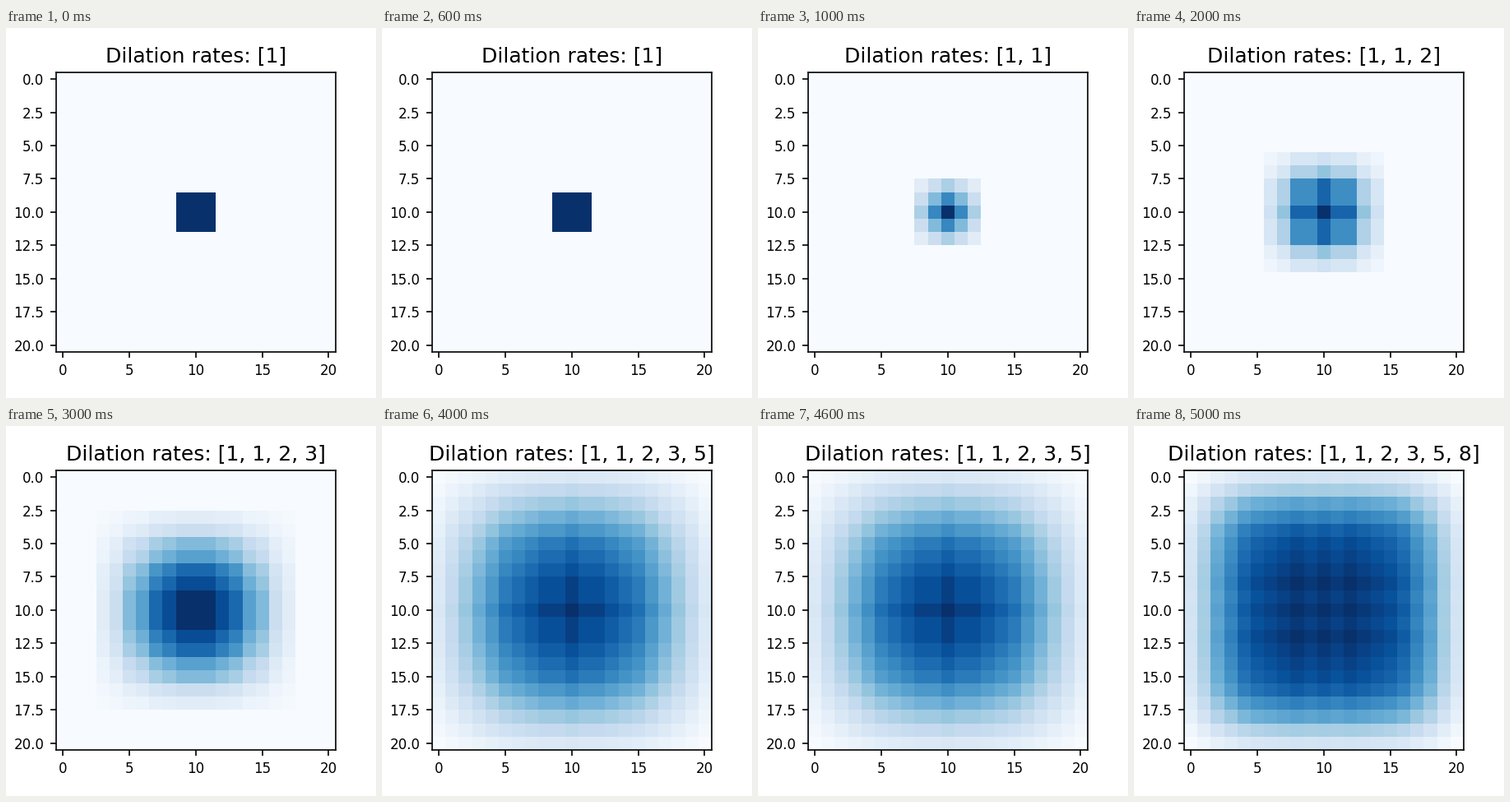
A matplotlib script that plays this animation: 450x450 px, repeating every 6000 ms.

```python
import numpy as np
import matplotlib.pyplot as plt
from matplotlib.animation import FuncAnimation

SIZE = 21
RATES = [1, 1, 2, 3, 5, 8]


def dilate(line, rate):
    """Apply a 3-tap kernel of ones with the given spacing, zero padded."""
    padded = np.pad(line, rate)
    return padded[:SIZE] + line + padded[2 * rate:]


def receptive_field(rates):
    """Trace the centre output back through the stack, last layer first."""
    line = np.zeros(SIZE)
    line[SIZE // 2] = 1
    for rate in reversed(rates):
        line = dilate(line, rate)
    return np.outer(line, line)


fig = plt.figure(figsize=(3, 3), dpi=150)
ax = fig.add_axes([0.125, 0.125, 0.775, 0.755])
ax.tick_params(labelsize=8)
image = ax.imshow(np.zeros((SIZE, SIZE)), cmap="Blues")
title = ax.set_title("", fontsize=12)


def update(step):
    rates = RATES[:step + 1]
    field = receptive_field(rates)
    image.set_data(field)
    image.set_clim(field.min(), field.max())
    title.set_text(f"Dilation rates: {rates}")
    return image, title


anim = FuncAnimation(fig, update, frames=len(RATES), interval=1000,
                     init_func=lambda: update(0), repeat=True, repeat_delay=0)
plt.show()
```
